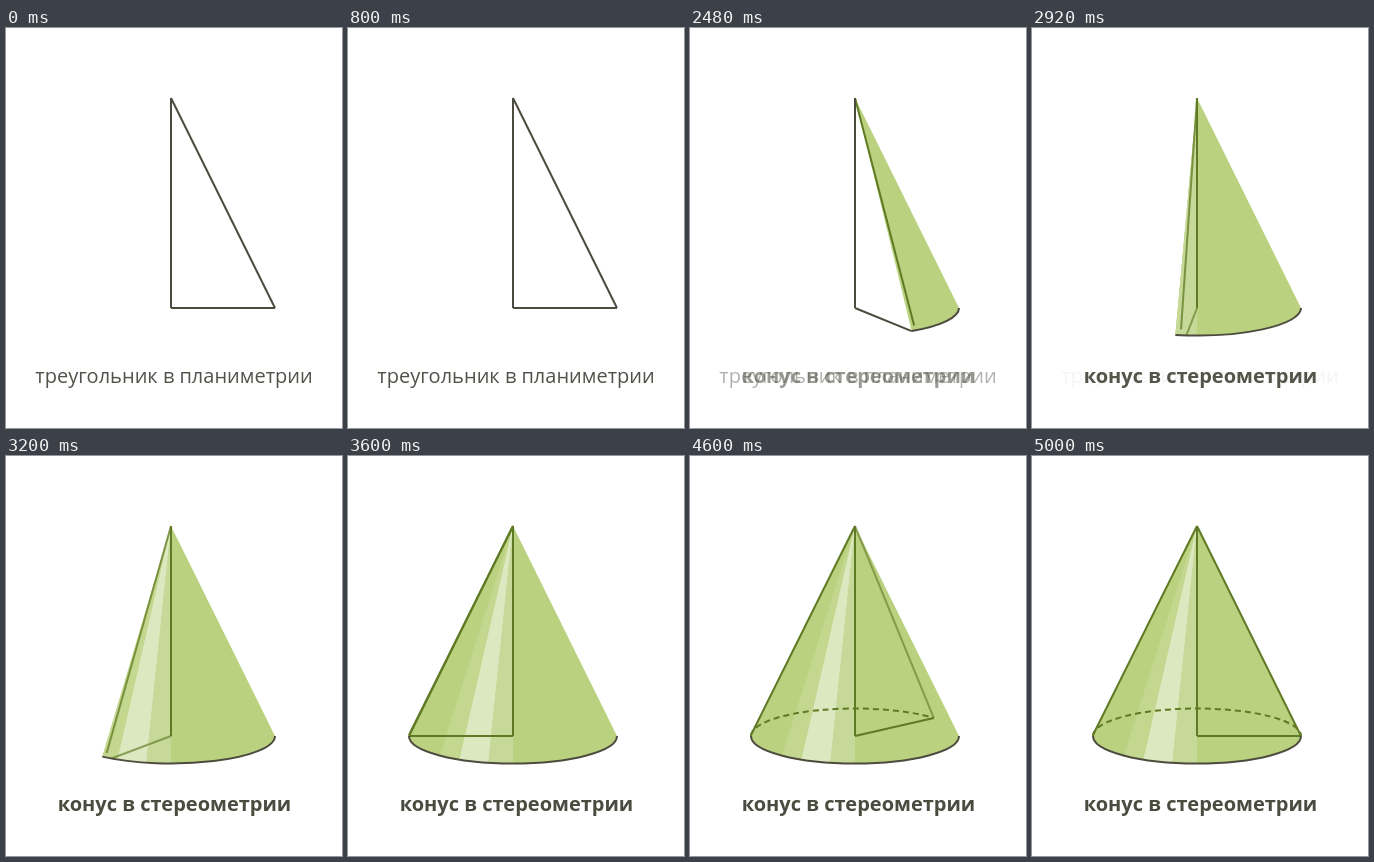
An HTML page for the animation above (5480 ms loop, 336x400 px).

```html
<!DOCTYPE html>
<html lang="ru">
<head>
<meta charset="utf-8">
<title>Треугольник и конус</title>
<style>
  html, body { margin: 0; width: 100%; height: 100%; overflow: hidden; background: #fff; }
  svg { display: block; width: 100%; height: 100%; }
  path { fill: none; stroke-width: 2; stroke-linejoin: round; }
  .shade path { stroke: none; }
  text { font: 20px "Open Sans", "Noto Sans", sans-serif; text-anchor: middle; fill: #52514a; }
  .bold { font-weight: 700; fill: #4c4b40; }
</style>
</head>
<body>
<svg viewBox="0 0 336 400">
  <clipPath id="swept"><path id="sector"/></clipPath>
  <g class="shade" clip-path="url(#swept)">
    <path fill="#bad17f" style="fill:#bad17f" d="M50 60H280V315H50Z"/>
    <path style="fill:#c4d78f" d="M165 70L91 302V312H165Z"/>
    <path style="fill:#dce8c0" d="M165 70L110 310H140Z"/>
    <path style="fill:#c7d998" d="M165 70L140 310H165Z"/>
  </g>
  <path id="back" stroke="#5f7a24" stroke-dasharray="6 4"/>
  <path id="left" stroke="#5f7a24" d="M165 70L61 279"/>
  <path id="radius"/>
  <path id="slant"/>
  <path id="axis" d="M165 70V280"/>
  <path id="front" stroke="#4d4b3e"/>
  <text id="flat" x="168" y="355">треугольник в планиметрии</text>
  <text id="solid" class="bold" x="168.5" y="355">конус в стереометрии</text>
</svg>
<script>
const LOOP = 5480, START = 1880, FRAME = 40, STEP = 1000 / 15;
const CX = 165, CY = 280, TOP = 70, RX = 104, RY = 27.5;
const INK = "#4d4b3e", GREEN = "#5f7a24";
// step count -> turn in degrees
const TURN = [[0, 0], [10, 57], [17, 102], [27, 180], [35, 262], [45, 342], [48, 360]];
const el = id => document.getElementById(id);
const set = (id, attrs) => {
  for (const name in attrs) el(id).setAttribute(name, attrs[name]);
};
const clamp = (v, lo, hi) => Math.min(hi, Math.max(lo, v));
const rad = deg => deg * Math.PI / 180;

function rim(deg) {
  return [CX + RX * Math.cos(rad(deg)), CY + RY * Math.sin(rad(deg))];
}

function slope(i) {
  const a = TURN[Math.max(0, i - 1)], b = TURN[Math.min(TURN.length - 1, i + 1)];
  return (b[1] - a[1]) / (b[0] - a[0]);
}

// Smooth curve through the turn table
function turnAt(n) {
  let i = 0;
  while (i < TURN.length - 2 && n > TURN[i + 1][0]) i++;
  const [x0, y0] = TURN[i], [x1, y1] = TURN[i + 1];
  const w = x1 - x0, u = (n - x0) / w, v = 1 - u;
  return y0 * v * v * (1 + 2 * u) + y1 * u * u * (3 - 2 * u)
    + w * u * v * (v * slope(i) - u * slope(i + 1));
}

function arc(from, to) {
  return `M${rim(from)}A${RX} ${RY} 0 0 1 ${rim(to)}`;
}

function draw(time) {
  const frame = Math.floor((time % LOOP) / FRAME) * FRAME;
  const n = clamp(Math.ceil((frame + FRAME - START) / STEP - 1e-6), 0, 48);
  const turn = turnAt(n), frontTurn = Math.min(turn, 180);
  const opening = turn < 180, behind = turn > 195 && turn < 335;
  const pale = turn > 90 && turn < 150;

  set("sector", { d: turn ? arc(0, frontTurn) + `L${CX} ${TOP}Z` : "M0 0" });
  set("front", { d: turn ? arc(0, frontTurn) : "M0 0" });
  set("back", { d: turn > 180 ? arc(180, Math.min(turn, 359.9)) : "M0 0" });
  set("left", { opacity: opening ? 0 : 1 });

  // The near edge sits just inside the surface while it opens
  const inset = opening ? Math.sin(rad(turn)) : 0;
  const [ex, ey] = rim(turn - 3 * inset), reach = 1 - 0.025 * inset;
  set("slant", {
    d: `M${CX} ${TOP}L${CX + (ex - CX) * reach} ${TOP + (ey - TOP) * reach}`,
    stroke: turn ? GREEN : INK,
    opacity: pale ? 0.75 : behind ? 0.6 : 1
  });

  const lag = turn > 57 && opening ? 6.7 * Math.sin(Math.PI * (turn - 57) / 123) : 0;
  set("radius", {
    d: `M${CX} ${CY}L${rim(turn - lag)}`,
    stroke: turn > 90 ? GREEN : INK,
    opacity: pale ? 0.65 : 1
  });
  set("axis", { stroke: turn > 90 ? GREEN : INK });

  const fade = clamp(n / 18, 0, 1);
  set("flat", { opacity: 1 - fade });
  set("solid", { opacity: fade });
}

const begin = performance.now();
function tick() {
  draw(performance.now() - begin);
  requestAnimationFrame(tick);
}
tick();
</script>
</body>
</html>
```
